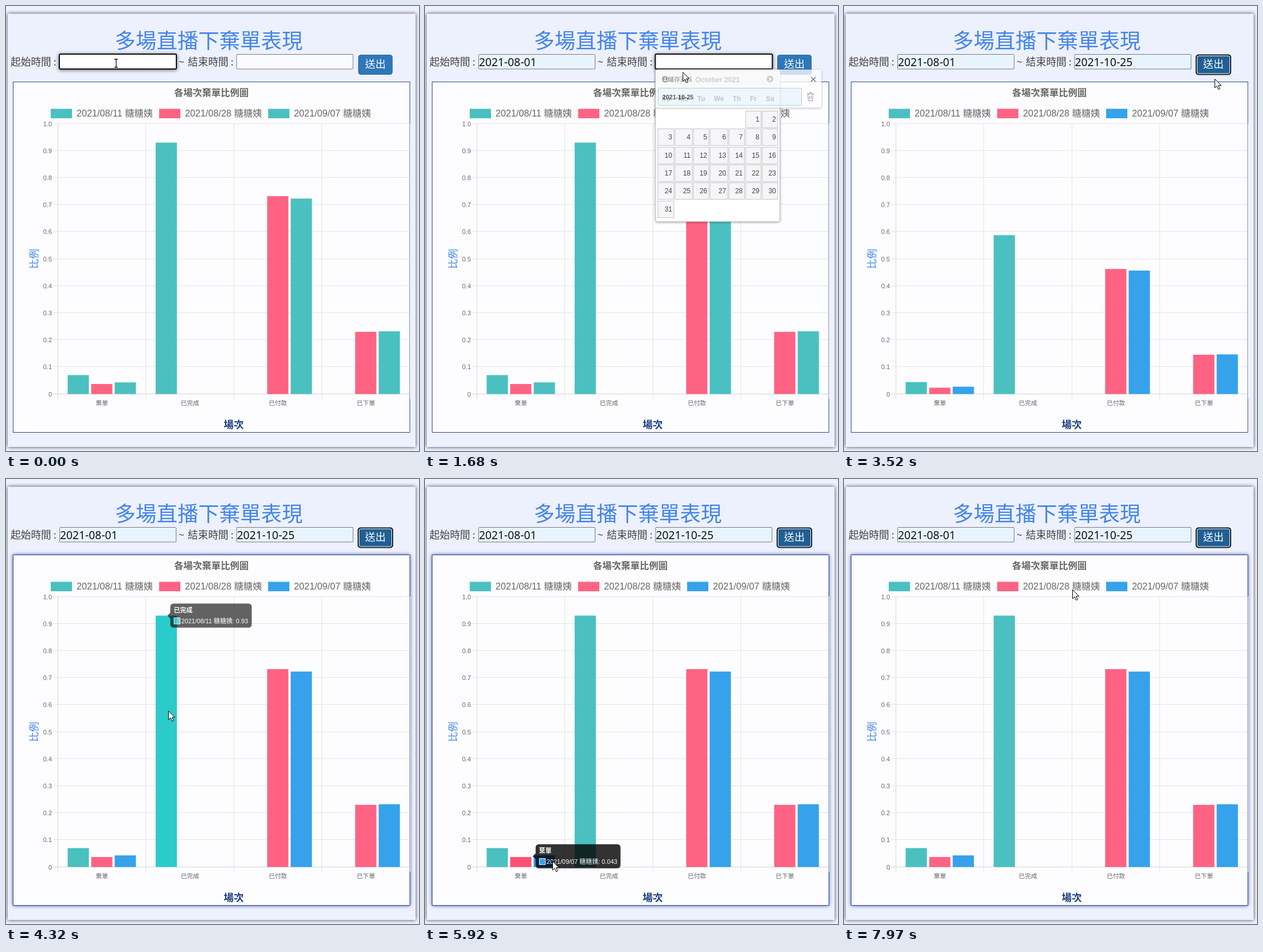
An HTML page that plays this animation: 720x777 px, repeating every 8 s.

```html
<!DOCTYPE html>
<html lang="zh-Hant">
<head>
<meta charset="utf-8">
<title>棄單表現</title>
<style>
  html, body { margin: 0; width: 100%; height: 100%; overflow: hidden; background: #edf0fd; }
  svg { display: block; width: 100vw; height: 100vh; cursor: default; }
  text { font-family: "Liberation Sans", "Noto Sans CJK TC", "Noto Sans CJK", sans-serif; white-space: pre; }
  .ui { font-family: "Noto Sans CJK TC", "Noto Sans CJK", sans-serif; }
  .value { font-family: "Noto Sans", "Open Sans", sans-serif; }
  #cardShadow { filter: drop-shadow(0 0 3px rgba(0, 0, 0, .75)); }
  #chartShadow { filter: drop-shadow(0 0 3px #24408a); }
  .panel { filter: drop-shadow(0 1px 2px rgba(0, 0, 0, .35)); }
  #ring1, #ring2 { filter: drop-shadow(0 1px 3px rgba(0, 0, 0, .6)); }
</style>
</head>
<body>
<svg id="stage" viewBox="0 0 720 777" preserveAspectRatio="none"></svg>
<script>
const LOOP = 8000, REDRAW = 3300, GROW = 1000, HOVER = 400;
const BASE = 677.5, SPAN = 472, LEFT = 90.5, GROUP = 153.4;
const TEAL = [75, 192, 192], PINK = [255, 99, 132], BLUE = [54, 162, 235];
const COLORS = [TEAL, PINK, BLUE];
const HOVER_COLORS = [[34, 206, 206], [255, 64, 104], [5, 154, 255]];
const CATEGORIES = ['棄單', '已完成', '已付款', '已下單'];
const SERIES = ['2021/08/11', '2021/08/28', '2021/09/07'].map(d => d + ' 糖糖姨');
const VALUES = [[.07, .037, .043], [.93, 0, 0], [0, .732, .723], [0, .23, .232]];

// [time, x, y] of the pointer
const POINTER = [
  [0, 192, 100], [450, 192, 100], [750, 190, 149], [1150, 190, 149],
  [1430, 440, 100], [1600, 440, 100], [1820, 470, 150], [2000, 470, 150],
  [2280, 365, 107], [2440, 365, 107], [2900, 646, 100], [3250, 646, 102],
  [3520, 646, 127], [4200, 285, 400], [4600, 275, 420], [4870, 125, 655],
  [5030, 113, 670], [5250, 113, 670], [5450, 165, 668], [5700, 168, 668],
  [5920, 222, 667], [6350, 224, 668], [6600, 228, 695], [6800, 228, 695],
  [7200, 236, 660], [7600, 248, 668], [7960, 398, 193], [8000, 398, 193]
];

const rgb = c => `rgb(${c.map(Math.round)})`;
const clamp = v => Math.max(0, Math.min(1, v));
const mix = (a, b, k) => a + (b - a) * k;
const easeOutQuart = p => 1 - (1 - clamp(p)) ** 4;
const smooth = p => p * p * (3 - 2 * p);
const fade = (t, from, to, d = 120) => clamp((t - from) / d) * (1 - clamp((t - to) / d));

const rect = (x, y, w, h, fill, extra = '') =>
  `<rect x="${x}" y="${y}" width="${w}" height="${h}" fill="${fill}" ${extra}/>`;
const line = (x1, y1, x2, y2, color) =>
  `<path d="M${x1} ${y1}L${x2} ${y2}" stroke="${color}"/>`;
// y is the visual middle of the line of text
const text = (x, y, s, size, fill, extra = '') =>
  `<text x="${x}" y="${y + size * .37}" font-size="${size}" fill="${fill}" ${extra}>${s}</text>`;
const MID = 'text-anchor="middle"', END = 'text-anchor="end"', BOLD = 'font-weight="700"';

const barX = (g, s) => 107.5 + GROUP * g + 41 * s;
const bars = [];
VALUES.forEach((row, g) => row.forEach((v, s) => {
  if (v) bars.push({ g, s, v, x: barX(g, s) + 18.5, y: BASE - v * SPAN });
}));
const findBar = (g, s) => bars.find(b => b.g === g && b.s === s);

const HOVERS = [
  [4200, findBar(1, 0)], [4640, null], [4864, findBar(0, 0)], [5400, findBar(0, 1)],
  [5864, findBar(0, 2)], [6450, null]
];

// Each hover pulls the value from wherever it is towards a new goal.
function follow(t, start, goal) {
  let v = start;
  HOVERS.forEach(([at, bar], i) => {
    if (t < at) return;
    const end = Math.min(t, i + 1 < HOVERS.length ? HOVERS[i + 1][0] : LOOP);
    v = mix(v, goal(bar, v), easeOutQuart((end - at) / HOVER));
  });
  return v;
}

function page() {
  const field = (x, n) =>
    rect(x + .5, 84.5, 203, 25.5, '#fafbff', `id="field${n}" stroke="#767a85" rx="1"`) +
    rect(x, 84, 204, 26, '#fff', `id="ring${n}" stroke="#101010" stroke-width="2" rx="2"`) +
    `<g id="value${n}">` + text(x + 1, 97.5, n === 1 ? '2021-08-01' : '2021-10-25', 19.3, '#111', 'class="value"') + '</g>' +
    rect(x + 102.5, 87, 1.2, 21, '#000', `id="caret${n}"`);
  const label = (x, s) => text(x, 97.5, s, 17.7, '#444', 'class="ui" font-weight="300"');
  return rect(0, 0, 720, 777, '#edf0fd') +
    rect(3, 13.5, 711, 756.5, '#edf0fd', 'id="cardShadow"') +
    text(353.5, 61, '多場直播下棄單表現', 36.4, '#4285ea', MID + ' class="ui" font-weight="500"') +
    label(8, '起始時間 :') + label(301, '~') + label(317, '結束時間 :') +
    field(93, 1) + field(401.5, 2) +
    rect(614.5, 85.5, 59, 34, '#2f77b8', 'id="button" stroke="#2e6da4" rx="4"') +
    `<g id="buttonRing">` + rect(614, 85.5, 60, 34, 'none', 'stroke="#101820" stroke-width="2" rx="4"') +
    rect(615.5, 87, 57, 31, 'none', 'stroke="#fff" rx="3"') + '</g>' +
    text(644, 101, '送出', 18, '#fff', MID + ' class="ui"');
}

function chart() {
  let out = rect(12.5, 132.5, 691.5, 612, '#fdfdff', 'id="chartShadow"') +
    rect(12.5, 132.5, 691.5, 612, '#fdfdff', 'stroke="#2c4a94"') +
    text(358, 150.5, '各場次棄單比例圖', 16.25, '#666', MID + ' ' + BOLD);
  SERIES.forEach((name, s) => {
    const x = [78, 267, 457][s];
    out += rect(x, 179.5, 37, 16.5, rgb(COLORS[s]), `id="key${s}"`) +
      text(x + 45, 187.5, name, 16.2, '#666');
  });
  for (let i = 0; i <= 10; i++) {
    const y = Math.round(BASE - i * SPAN / 10) - .5;
    out += line(82, y, 703, y, i ? '#e4e4ea' : '#d3d3cf') +
      text(80, y, i === 0 ? '0' : (i / 10).toFixed(1), 11, '#666', END);
  }
  for (let i = 0; i < 5; i++) {
    const x = Math.floor(LEFT + i * GROUP) + .5;
    out += line(x, 205, x, 686, i ? '#e4e4ea' : '#d9d9d4');
  }
  CATEGORIES.forEach((c, g) => out += text(LEFT + GROUP * (g + .5), 693, c, 10.7, '#666', MID));
  bars.forEach((b, i) => out += rect(b.x - 18.5, b.y, 37, 0, '#000', `id="bar${i}"`));
  return out +
    text(0, 0, '比例', 17.5, '#3f84ee', MID + ' class="ui" font-weight="500" transform="translate(49 441.5) rotate(-90)"') +
    text(397, 731, '場次', 17.5, '#1d3f82', MID + ' class="ui" font-weight="700"');
}

function calendar(id, left, title, firstCol, days, chosen) {
  const cols = [4, 34, 66, 95, 128, 157, 186], widths = [28, 30, 27, 31, 27, 27, 27];
  const rows = Math.ceil((firstCol + days) / 7);
  const arrow = (x, dir) => `<circle cx="${x}" cy="127.5" r="6" fill="#3c3c3c"/>` +
    `<path d="M${x - dir * 1.5} 124.5l${dir * 3} 3l${-dir * 3} 3" fill="none" stroke="#fff" stroke-width="1.6"/>`;
  let out = `<g id="${id}">` +
    rect(left + .5, 111, 216.5, 77.5 + rows * 31.3, '#fff', 'stroke="#c5c5c5" rx="3" class="panel"') +
    rect(left + 3.5, 114, 211, 29, '#e9e9ee', 'stroke="#dddde2" rx="3"') +
    arrow(left + 17.5, -1) + arrow(left + 200, 1) +
    text(left + 108.5, 128, title, 12.3, '#333', MID + ' ' + BOLD);
  ['Su', 'Mo', 'Tu', 'We', 'Th', 'Fr', 'Sa'].forEach((d, c) =>
    out += text(left + [18.5, 49, 80, 111, 142, 171, 200][c], 161.5, d, 12, '#333', MID + ' ' + BOLD));
  for (let d = 1; d <= days; d++) {
    const c = (firstCol + d - 1) % 7, r = Math.floor((firstCol + d - 1) / 7);
    const x = left + cols[c] + .5, y = Math.round(183 + r * 31.3) + .5, on = d === chosen;
    out += rect(x, y, widths[c], 29, on ? '#007fff' : '#f6f6f8', `stroke="${on ? '#003eff' : '#c5c5c9'}"`) +
      text(x + widths[c] - 3, y + 14.5, d, 12, on ? '#fff' : '#454545', END);
  }
  return out + '</g>';
}

function savedList(id, x, value) {
  return `<g id="${id}">` + rect(x, 111, 289, 66.5, '#fff', 'rx="3" class="panel"') +
    text(x + 11, 128, '已儲存資料', 10.6, '#666') +
    `<path d="M${x + 271} 124l8 8m0-8l-8 8" stroke="#444" stroke-width="1.3"/>` +
    rect(x + 4.5, 143.5, 250, 30, '#e9f5fc', 'stroke="#8fc5e4" rx="2"') +
    text(x + 12, 159.5, value, 10.6, '#222', BOLD) +
    `<path d="M${x + 264} 153.5h12m-8 0v-2.5h4v2.5m-6.500 0l1 12h7l1-12m-6 3v6m3-6v6" fill="none" stroke="#777"/></g>`;
}

const stage = document.getElementById('stage');
stage.innerHTML = page() + chart() +
  calendar('cal1Empty', 93, 'October 2021', 5, 31, 0) +
  calendar('cal1', 93, 'August 2021', 0, 31, 1) +
  calendar('cal2Empty', 401.5, 'October 2021', 5, 31, 0) +
  calendar('cal2', 401.5, 'October 2021', 5, 31, 25) +
  savedList('list1', 93.5, '2021-08-01') + savedList('list2', 402, '2021-10-25') +
  '<g id="tip"><path id="tipBox" fill="rgba(0,0,0,.8)"/>' +
  text(13, -10, '', 10.9, '#fff', BOLD + ' id="tipTitle"') +
  rect(13.5, 4, 10.500, 10.500, '#000', 'id="tipKey" stroke="#fff"') +
  text(26, 9, '', 10.9, '#fff', 'id="tipText"') + '</g>' +
  '<g id="pointer"><path id="arrow" d="M.5.5v15.500l3.600-3.400 2.600 6 2.600-1.100-2.600-5.800h4.900z" fill="#fff" stroke="#000"/>' +
  '<path id="ibeam" d="M-3-7h2.300l.7.700.7-.7h2.300M0-6.300v12.600M-3 7h2.300l.7-.7.7.7h2.300" fill="none" stroke="#111" stroke-width="1.3"/></g>';

const el = {};
stage.querySelectorAll('[id]').forEach(e => el[e.id] = e);
const show = (id, v) => el[id].style.opacity = +v;
const attr = (id, name, v) => el[id].setAttribute(name, v);

function drawForm(t) {
  const typed1 = t >= 750, typed2 = t >= 1820, pressed = t >= 3000;
  show('cardShadow', 1 - fade(t, 600, 1200) - fade(t, 1720, 2060));
  show('ring1', t < 750);
  show('ring2', t >= 1520 && t < 1820);
  show('value1', typed1);
  show('value2', typed2);
  show('caret1', typed1 && t < 1520);
  show('caret2', typed2 && t < 2900);
  attr('field1', 'fill', typed1 ? '#e8f4fd' : '#fafbff');
  attr('field2', 'fill', typed2 ? '#e8f4fd' : '#fafbff');
  attr('button', 'fill', pressed ? '#205f93' : '#2f77b8');
  show('buttonRing', pressed);
  show('cal1Empty', t < 1030 ? fade(t, 150, LOOP) : 0);
  show('cal1', t >= 1030 ? fade(t, 0, 1520) : 0);
  show('cal2Empty', t < 1960 ? fade(t, 1540, LOOP) : 0);
  show('cal2', t >= 1960 ? fade(t, 0, 2430) : 0);
  show('list1', fade(t, 150, 1050, 160));
  show('list2', fade(t, 1560, 1980, 160));
}

function drawChart(t) {
  const fresh = t >= REDRAW;
  const grow = fresh ? easeOutQuart((t - REDRAW) / GROW) : 1;
  const colorOf = s => s === 2 && !fresh ? TEAL : COLORS[s];
  show('chartShadow', fade(t, 3560, LOOP));
  attr('key2', 'fill', rgb(colorOf(2)));
  bars.forEach((b, i) => {
    const h = b.v * SPAN * grow;
    const lit = follow(t, 0, bar => bar === b ? 1 : 0);
    attr('bar' + i, 'y', BASE - h);
    attr('bar' + i, 'height', h);
    attr('bar' + i, 'fill', rgb(colorOf(b.s).map((c, k) => mix(c, HOVER_COLORS[b.s][k], lit))));
  });
}

function drawTip(t) {
  const first = HOVERS[0][1];
  const bar = HOVERS.reduce((found, [at, b]) => t >= at && b ? b : found, first);
  const x = follow(t, first.x, (b, v) => b ? b.x : v);
  const y = follow(t, first.y, (b, v) => b ? b.y : v);
  const label = `${SERIES[bar.s]}: ${bar.v}`;
  const w = 142 + (String(bar.v).length - 4) * 6;
  show('tip', follow(t, 0, b => b ? 1 : 0));
  attr('tip', 'transform', `translate(${x} ${y})`);
  attr('tipBox', 'd', `M2 0l5-5v-10q0-6 6-6h${w - 12}q6 0 6 6v30q0 6-6 6h${12 - w}q-6 0-6-6v-10z`);
  attr('tipKey', 'fill', rgb(COLORS[bar.s]));
  el.tipTitle.textContent = CATEGORIES[bar.g];
  el.tipText.textContent = label;
}

function drawPointer(t) {
  const i = Math.max(1, POINTER.findIndex(p => p[0] > t));
  const [t0, x0, y0] = POINTER[i - 1], [t1, x1, y1] = POINTER[i];
  const k = smooth((t - t0) / (t1 - t0));
  const x = mix(x0, x1, k), y = mix(y0, y1, k);
  const overText = y < 111 && x < 612;
  attr('pointer', 'transform', `translate(${x} ${y})`);
  show('ibeam', overText);
  show('arrow', !overText);
}

function render(now) {
  const t = now % LOOP;
  drawForm(t);
  drawChart(t);
  drawTip(t);
  drawPointer(t);
}

function tick(now) {
  render(now);
  requestAnimationFrame(tick);
}
render(0);
requestAnimationFrame(tick);
</script>
</body>
</html>
```
